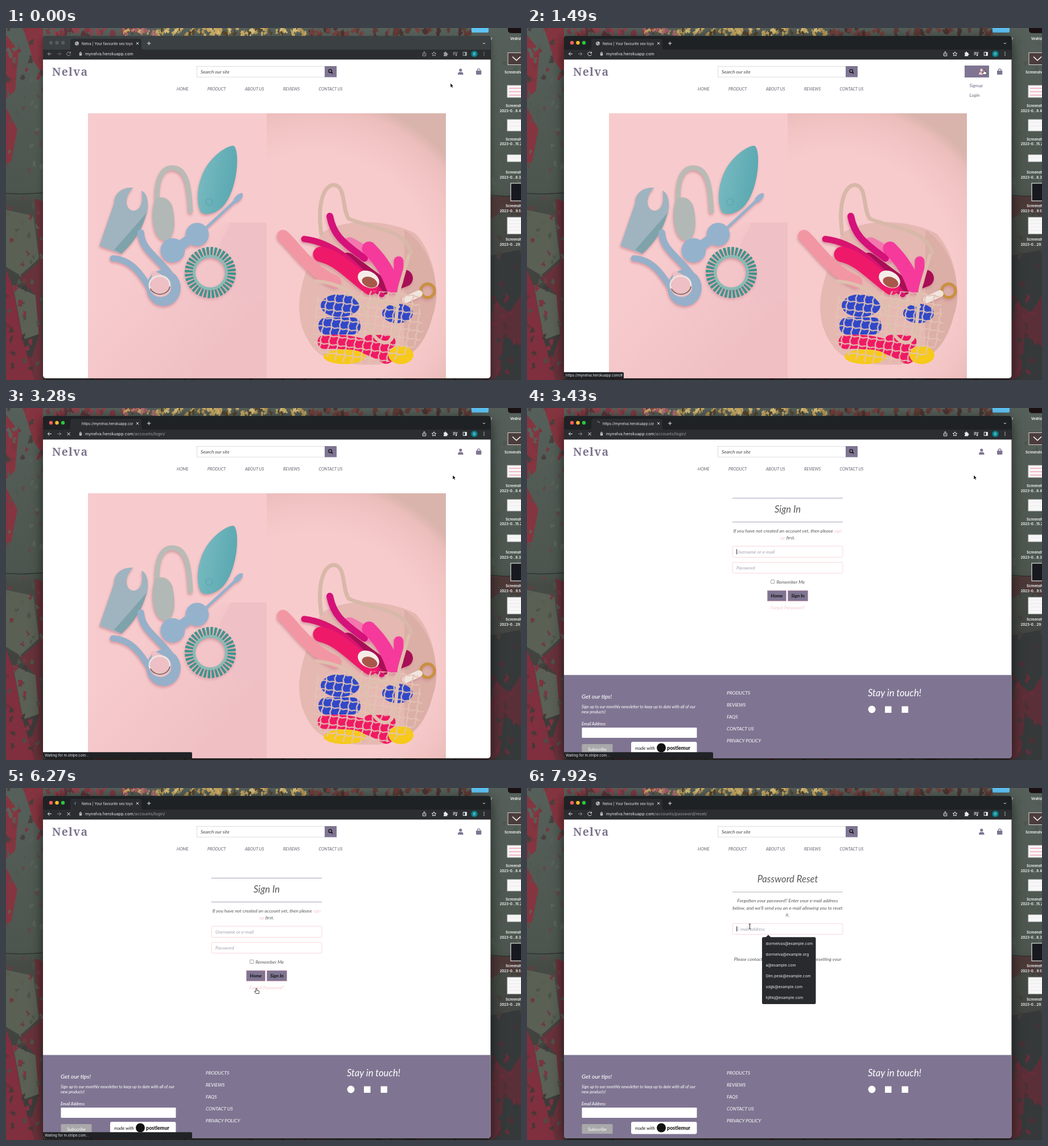
An HTML page for the animation above (8 s loop, 905 by 619 pixels).

```html
<!DOCTYPE html>
<html lang="en">
<head>
<meta charset="utf-8">
<title>Shop account walkthrough</title>
<style>
html, body { margin: 0; width: 100%; height: 100%; overflow: hidden; background: #434a45; }
svg { display: block; width: 100vw; height: 100vh; }
text { white-space: pre; }
#page { font: italic 8.32px Lato, sans-serif; fill: #5a5a5a; }
.ui { font: 6.24px Inter, sans-serif; fill: #e8eaed; }
.mid { text-anchor: middle; }
.big { font-size: 16.64px; }
.small { font-size: 7.28px; }
.pale { fill: #f9c6cf; }
.hint { fill: #a3a3b3; }
.box { fill: #fff; stroke: #f8cdd4; stroke-width: .8; }
.btn { fill: #7f7592; stroke: #e5a3b5; stroke-width: .6; }
.line { fill: none; stroke: #e8eaed; stroke-width: 1; }
.photo path { stroke-linecap: round; }
.lit { filter: drop-shadow(-1px 3px 2px #c9868fb0); }
#desk { font: 600 6.1px Inter, sans-serif; fill: #fff; }
</style>
</head>
<body>
<svg viewBox="0 0 905 619" preserveAspectRatio="none">
<defs>
  <clipPath id="win"><rect x="65" y="14" width="786.5" height="602" rx="5"/></clipPath>
  <clipPath id="pic"><rect x="144" y="150" width="629" height="466"/></clipPath>
  <clipPath id="tabClip"><rect x="132" y="20" width="91" height="14"/></clipPath>
  <linearGradient id="wall" x2="0" y2="1">
    <stop offset="0" stop-color="#56605a"/><stop offset=".46" stop-color="#4c564e"/>
    <stop offset=".5" stop-color="#464b45"/><stop offset="1" stop-color="#3a3838"/>
  </linearGradient>
  <linearGradient id="shade" gradientUnits="userSpaceOnUse" x1="240" y1="400" x2="400" y2="540">
    <stop offset="0" stop-color="#f7cbcd"/><stop offset="1" stop-color="#efbfc4"/>
  </linearGradient>
  <radialGradient id="glow" gradientUnits="userSpaceOnUse" cx="540" cy="430" r="370">
    <stop offset=".56" stop-color="#f7cbcc"/><stop offset=".7" stop-color="#f2c4c4"/>
    <stop offset=".79" stop-color="#ebbdbb"/><stop offset=".84" stop-color="#d9b4ac"/>
  </radialGradient>
  <linearGradient id="leaf" x2="1" y2=".3"><stop offset="0" stop-color="#7cbcc2"/><stop offset="1" stop-color="#5ba9b2"/></linearGradient>
  <pattern id="net" width="15" height="15" patternUnits="userSpaceOnUse" patternTransform="rotate(8)">
    <path d="M0 8Q8 4 15 8M8 0Q12 8 8 15" fill="none" stroke="#e3c3b3" stroke-width="2.2"/>
  </pattern>
  <pattern id="knit" width="10" height="10" patternUnits="userSpaceOnUse" patternTransform="rotate(38)">
    <path d="M0 4Q5 7 10 4M4 0Q7 5 4 10" fill="none" stroke="#ebcfc2" stroke-width="1.7"/>
  </pattern>
</defs>

<rect width="905" height="619" fill="url(#wall)"/>
<g id="paint">
  <path d="M0 12L22 40 16 110 0 125ZM30 0H65V82L48 58ZM0 140L20 178 9 235 0 238Z" fill="#85353f"/>
  <path d="M0 320L48 330 58 405 25 435 0 420ZM12 452L52 470 58 538 30 548Z" fill="#5a6054"/>
  <path d="M50 300L65 305V480L58 400ZM24 440L60 410 65 619H32L58 540 52 470Z" fill="#68323a"/>
  <path d="M0 425L12 455 30 550 50 619H0Z" fill="#7f2f3d"/>
  <path d="M852 296H905V330L875 322 852 335Z" fill="#4c3837"/>
  <path d="M852 400L905 390V619H852Z" fill="#35393a"/>
  <path d="M858 480L885 500 905 470V560L875 540 868 610 852 619V520Z" fill="#5a2f38"/>
</g>
<path d="M0 291L30 292 65 290M851 294L880 296 905 293" fill="none" stroke="#24282a" stroke-width="1.2"/>
<g id="desk"></g>

<rect id="shadow" x="65" y="14" width="786.5" height="602" rx="5"/>
<g clip-path="url(#win)">
  <rect id="strip" x="65" y="14" width="787" height="24"/>
  <path d="M110 38Q113 38 113 34V23Q113 19 117 19H234Q238 19 238 23V34Q238 38 241 38H852V56H65V38Z" fill="#2b2d30"/>
  <g id="lights"><circle cx="79" cy="26" r="3.2"/><circle cx="89.5" cy="26" r="3.2"/><circle cx="100" cy="26" r="3.2"/></g>
  <g id="globe"><circle cx="124.5" cy="27.2" r="3.4" fill="#c3c8ce"/><path d="M122 25l2.5.5-.5 2-2 .4M125 30l1-2 1.5-.3" fill="none" stroke="#45494d" stroke-width=".9"/></g>
  <path id="spin" d="M124.5 24A3.3 3.3 0 0 1 127.8 27.3" fill="none" stroke="#8ab4f8" stroke-width=".9"/>
  <text id="tab" class="ui" x="133" y="29.5" clip-path="url(#tabClip)"></text>
  <path class="line" d="M229 25l4.2 4.2M233.2 25l-4.2 4.2M248 27h6.4M251.2 23.8v6.4M838 26l2 2 2-2"/>
  <g id="tools">
    <path class="line" d="M80 45.5H73.5M76.5 42.3L73.3 45.5 76.5 48.7"/>
    <path class="line" d="M90 45.5H96.5M93.5 42.3L96.7 45.5 93.5 48.7" opacity=".5"/>
    <path id="reload" class="line" d="M112.8 43.5A3.3 3.3 0 1 0 113.3 46.5M113.5 41.8V44.2H111"/>
    <path id="stop" class="line" d="M107.5 43l5.2 5.2M112.7 43l-5.2 5.2"/>
    <path class="line" d="M733.5 44.5H732.3V49H737.8V44.5H736.6M735 47V41.5M733.3 43.2L735 41.5 736.7 43.2" stroke-width=".8"/>
    <path class="line" d="M752 41.8l1.1 2.5 2.7.3-2 1.8.6 2.7-2.4-1.4-2.4 1.4.6-2.7-2-1.8 2.7-.3z" stroke-width=".8"/>
    <path d="M769 43.2h2v-.6a1.1 1.1 0 0 1 2.2 0v.6h2v2h.5a1.1 1.1 0 0 1 0 2.2h-.5v2h-6.2v-2a1.1 1.1 0 0 0 0-2.2z" fill="#e8eaed"/>
    <path class="line" d="M785.5 43h5M785.5 45h5M785.5 47h3M791.8 48V43h1.7"/><circle cx="791" cy="48" r="1.2" fill="#e8eaed"/>
    <path class="line" d="M803.3 42.5h6v6h-6z"/><path d="M806.5 42.5h3v6h-3z" fill="#e8eaed"/>
    <g fill="#e8eaed"><circle cx="840" cy="42.7" r=".8"/><circle cx="840" cy="45.5" r=".8"/><circle cx="840" cy="48.3" r=".8"/></g>
  </g>
  <circle cx="823" cy="45.5" r="5.6" fill="#00838f"/><text class="ui mid" x="823" y="47.6">B</text>
  <path d="M128.8 44.8h4.4v3.6h-4.4z" fill="#bdc1c6"/><path class="line" d="M129.7 45v-1.2a1.3 1.3 0 0 1 2.6 0V45" stroke-width=".7"/>
  <text class="ui" x="139" y="48.2" style="font-size:7.28px">mynelva.herokuapp.com<tspan id="path" fill="#9aa0a6"></tspan></text>

  <g id="page">
    <rect x="65" y="55.5" width="787" height="562" fill="#fff"/>
    <text x="81" y="84" style="font:600 19.5px 'Noto Serif',serif;letter-spacing:1.3px" fill="#7c748c">Nelva</text>
    <rect x="335.4" y="67.4" width="225" height="18.8" fill="#fff" stroke="#d5d5dc" stroke-width=".8"/>
    <text x="342" y="80" fill="#444">Search our site</text>
    <rect x="560" y="67" width="21" height="19.5" fill="#7f7592"/>
    <path d="M571.5 77.5L574 80.3" stroke="#111" stroke-width="1.7"/><circle cx="569.7" cy="75.7" r="2.8" fill="none" stroke="#111" stroke-width="1.3"/>
    <g class="small" fill="#666170"><text x="300" y="110">HOME</text><text x="354" y="110">PRODUCT</text><text x="420" y="110">ABOUT US</text><text x="487" y="110">REVIEWS</text><text x="549.5" y="110">CONTACT US</text></g>
    <rect id="hover" x="769" y="66" width="43" height="21" fill="#7f7592"/>
    <g id="user"><circle cx="798.8" cy="74" r="2.6"/><path d="M794 82Q794 77.4 797 77.4H800.6Q803.6 77.4 803.6 82Z"/></g>
    <path d="M826 75h9.4v5.5q0 1.5-1.5 1.5h-6.4q-1.5 0-1.5-1.5z" fill="#7f7592"/><path d="M828.3 76v-1.8a2.4 2.4 0 0 1 4.8 0V76" fill="none" stroke="#7f7592" stroke-width="1.2"/>

    <g id="home" class="photo" clip-path="url(#pic)">
      <rect x="144" y="150" width="315" height="467" fill="#f7cbcd"/>
      <path d="M458 342H380L300 400H144V617H458Z" fill="url(#shade)"/>
      <path d="M458 342H395L375 380 400 480H458Z" fill="#efc0c5"/>
      <rect x="458" y="150" width="315" height="467" fill="url(#glow)"/>
      <g class="lit">
        <path d="M190 308C190 290 205 279 224 281 211 291 206 316 222 321 237 323 242 304 238 286 249 290 252 310 247 328L203 397 164 383Z" fill="#a0b4c0"/>
        <path d="M190 390L247 325Q238 365 203 397Z" fill="#7fa3ab"/>
        <path d="M266 315C262 262 276 246 292 246 318 246 322 280 324 322" fill="none" stroke="#b9bbb6" stroke-width="9"/>
        <path d="M262 302C270 295 284 296 292 312 300 345 296 374 278 374 258 372 252 325 262 302Z" fill="#b2b8b5"/>
        <path d="M400 207C412 215 407 288 380 315 365 329 345 331 341 321 332 300 338 262 356 238 372 217 392 206 400 207Z" fill="url(#leaf)"/>
        <circle cx="357" cy="306" r="6" fill="none" stroke="#559fa8"/>
        <g fill="#95b2cd"><circle cx="293" cy="391" r="21.5"/><circle cx="336" cy="363" r="20.5"/><path d="M300 387L330 367" stroke="#95b2cd" stroke-width="18"/><path d="M350 353L404 303" stroke="#95b2cd" stroke-width="5"/><ellipse cx="408" cy="299" rx="11" ry="5" transform="rotate(-46 408 299)"/></g>
        <g fill="none" stroke="#96b0c9"><path d="M237 360C238 392 272 405 294 442" stroke-width="12"/><path d="M188 405C220 407 238 432 255 462" stroke-width="11"/></g>
        <ellipse cx="277" cy="457" rx="30" ry="32" fill="#96b0c9"/>
        <path d="M258 427Q287 437 290 455A18 16 0 0 1 253 458Z" fill="#eebfc4"/>
        <ellipse cx="270" cy="452" rx="18" ry="16" fill="none" stroke="#eee3df" stroke-width="3"/><path d="M254 459A18 16 0 0 0 288 455" fill="none" stroke="#8d6c68" stroke-width="2"/>
        <circle cx="359" cy="430" r="36" fill="none" stroke="#3f948d" stroke-width="18" stroke-dasharray="3.9 2.383"/>
        <circle cx="359" cy="430" r="28.5" fill="none" stroke="#8bbab4" stroke-width="5"/>
      </g>

      <path id="bag" d="M553 362C600 330 680 340 720 362 755 400 763 470 750 505 735 560 705 593 640 592 570 592 540 580 520 525 508 480 520 440 553 362Z" fill="#e5b8b2"/>
      <use href="#bag" style="fill:url(#knit)"/>
      <path d="M700 355C755 390 765 470 750 505 740 550 720 570 700 582Z" fill="#c99a90" opacity=".35"/>
      <path d="M554 362C546 305 560 275 577 276 598 279 590 318 602 335 635 352 700 350 712 395" fill="none" stroke="#d8b8a9" stroke-width="7"/>
      <g fill="none" class="lit">
        <path d="M600 410L660 455 700 440" stroke="#a80f55" stroke-width="30"/>
        <path d="M487 366C508 385 535 428 578 446" stroke="#f396a3" stroke-width="22"/>
        <path d="M604 380L640 400" stroke="#f377ae" stroke-width="24"/>
        <path d="M569 331C575 362 588 375 630 405" stroke="#d5117a" stroke-width="12"/>
        <path d="M524 371C575 377 610 410 660 468" stroke="#d91370" stroke-width="11"/>
        <path d="M553 398C585 405 605 430 640 456" stroke="#ee1a69" stroke-width="27"/>
        <path d="M638 388C660 410 672 430 680 455" stroke="#f53a9b" stroke-width="25"/>
        <path d="M690 410V445" stroke="#f53a9b" stroke-width="17"/>
        <circle cx="741" cy="462" r="12" stroke="#c8913f" stroke-width="5"/><path d="M702 478L726 467" stroke="#f1e5df" stroke-width="12"/>
      </g>
      <ellipse cx="637" cy="442" rx="20" ry="14" transform="rotate(28 637 442)" fill="#f6ede8"/><ellipse cx="639" cy="447" rx="14" ry="9" transform="rotate(20 639 447)" fill="#a8584a"/>
      <g fill="#3048c8"><ellipse cx="587" cy="488" rx="34" ry="20"/><ellipse cx="688" cy="502" rx="27" ry="17"/><rect x="549" y="509" width="74" height="30" rx="14"/></g>
      <path d="M560 552Q620 548 668 578M640 552H672" fill="none" stroke="#f01963" stroke-width="25"/>
      <g fill="#f6c91b"><ellipse cx="595" cy="578" rx="37" ry="13"/><ellipse cx="694" cy="575" rx="22" ry="16"/></g>
      <path d="M545 470Q640 455 725 470L735 540Q700 592 640 591 560 592 540 555Z" fill="url(#net)"/>
      <path d="M545 445C595 450 618 470 632 500 638 540 655 554 668 553 690 550 683 500 692 455L708 400" fill="none" stroke="#dfbfae" stroke-width="6"/>
      <path d="M630 488Q655 475 690 490" fill="none" stroke="#dfbfae" stroke-width="5"/>
    </g>

    <g id="menu"><rect id="itemBg" x="769" width="80" height="17" fill="#e9ecef"/><g fill="#6f6780"><text x="777.5" y="103.5">Signup</text><text x="777.5" y="120.5">Login</text></g></g>

    <g id="signin">
      <path d="M361 158.5H555M361 200.5H555" stroke="#9d97b6" stroke-width=".9"/>
      <text class="mid big" x="458" y="183.5">Sign In</text>
      <text class="mid" x="458" y="218.5">If you have not created an account yet, then please <tspan class="pale">sign</tspan></text>
      <text class="mid" x="458" y="231"><tspan class="pale">up</tspan> first.</text>
      <rect id="ring" x="360.5" y="242" width="195.5" height="21.5" rx="2.5" fill="none" stroke="#b4d4fd" stroke-width="2.4"/>
      <rect class="box" id="name" x="361.4" y="243" width="193.6" height="19.5" rx="2"/><text class="hint" x="368" y="255.7">Username or e-mail</text>
      <rect class="box" x="361.4" y="271.4" width="193.6" height="19" rx="2"/><text class="hint" x="368" y="284">Password</text>
      <rect x="428.6" y="302.3" width="6.2" height="6.2" rx="1" fill="#fff" stroke="#767676" stroke-width=".7"/><text x="438.5" y="308.6">Remember Me</text>
      <rect class="btn" x="422.3" y="321" width="33.2" height="18.5"/><rect class="btn" x="458.3" y="321" width="35.4" height="18.5"/>
      <g class="mid" font-weight="700" fill="#111"><text x="439" y="333.2">Home</text><text x="476" y="333.2">Sign In</text></g>
      <text class="mid pale" x="458" y="353.6">Forgot Password?</text>
    </g>

    <g id="reset">
      <text class="mid big" x="458" y="166">Password Reset</text>
      <path d="M361 183H555" stroke="#aaa" stroke-width=".9"/>
      <g class="mid"><text x="458" y="201">Forgotten your password? Enter your e-mail address</text><text x="458" y="213.5">below, and we'll send you an e-mail allowing you to reset</text><text x="458" y="226">it.</text><text x="458" y="303.7">Please contact us if you have any trouble resetting your</text><text x="458" y="316.2">password.</text></g>
      <rect class="box" x="361.4" y="238.4" width="193.6" height="19" rx="2"/><text class="hint" x="368" y="250.8">E-mail address</text>
      <rect class="btn" x="418.9" y="266.9" width="78.6" height="18.5"/><text class="mid" x="458" y="279" fill="#111">Reset My Password</text>
    </g>
    <rect id="caret" x="368" width=".8" height="9.5" fill="#222"/>

    <g id="foot" fill="#fff">
      <rect x="65" y="469.5" width="787" height="148" fill="#7f7592"/>
      <text x="96" y="511" style="font-size:10.4px;font-weight:500">Get our tips!</text>
      <g class="small"><text x="96" y="528">Sign up to our monthly newsletter to keep up to date with all of our</text><text x="96" y="537">new products!</text><text x="96" y="558" font-weight="500">Email Address <tspan fill="#e85c5c">*</tspan></text></g>
      <rect x="96.5" y="562" width="202" height="18" rx="1"/>
      <rect x="96.5" y="591" width="54" height="17" rx="1.5" fill="#a9a8aa"/><text class="mid" x="123.5" y="602.5">Subscribe</text>
      <rect x="183" y="587" width="115.5" height="21.5" rx="3"/>
      <g fill="#111" font-style="normal"><text x="190" y="600.8" style="font-size:7.6px">made with</text><circle cx="236" cy="597.5" r="8"/><text x="246" y="600.5" style="font-size:9px;font-weight:800">postlemur</text></g>
      <text x="351" y="504">PRODUCTS</text><text x="351" y="525">REVIEWS</text><text x="351" y="546">FAQS</text><text x="351" y="567">CONTACT US</text><text x="351" y="588">PRIVACY POLICY</text>
      <text class="big" x="599" y="506.5">Stay in touch!</text>
      <circle cx="606" cy="530" r="6.5"/><rect x="629" y="524.5" width="11.5" height="11.5"/><rect x="658.5" y="524.5" width="11.5" height="11.5"/>
    </g>
  </g>
  <g id="status"><rect x="63" y="605.2" height="14" rx="2" fill="#202225"/><text class="ui" x="68" y="613.3"></text></g>
</g>
<g id="popup"><path d="M419 263L424 258.3 429 263Z" fill="#282a2d"/><rect x="413" y="262.3" width="94.5" height="117.7" rx="2.5" fill="#282a2d"/></g>
<g id="cursor" stroke-linejoin="round">
  <path id="arrow" d="M0 0V7.6L1.8 6 3 8.8 4.3 8.2 3.1 5.5H5.5Z" fill="#000" stroke="#fff" stroke-width=".6"/>
  <path id="hand" d="M-1 .8Q-1-.3 0-.3T1 .8V3.6L4 4.2Q5.2 4.5 5 5.8L4.3 9H-.8L-3.4 5.8Q-3.3 4.6-2 5L-1 5.8Z" fill="#fff" stroke="#111" stroke-width=".8"/>
  <path id="beam" d="M-1.7-4.5Q0-4.5 0-3.5Q0-4.5 1.7-4.5M0-3.5V3.5M-1.7 4.5Q0 4.5 0 3.5Q0 4.5 1.7 4.5" fill="none" stroke="#111" stroke-width=".9"/>
</g>
</svg>
<script>
const $ = id => document.getElementById(id);
const add = (parent, tag, attrs, text) => {
  const el = document.createElementNS('http://www.w3.org/2000/svg', tag);
  for (const k in attrs) el.setAttribute(k, attrs[k]);
  if (text) el.textContent = text;
  return parent.appendChild(el);
};
const show = (id, on) => $(id).setAttribute('visibility', on ? 'inherit' : 'hidden');
const within = (t, a, b) => t >= a && t < b;
const held = (keys, t) => keys.filter(k => k[0] <= t).pop();

// Weathered wall: small jagged flakes scattered in an area
let seed = 7;
const rnd = () => (seed = seed * 16807 % 2147483647) / 2147483647;
function flakes(x, y, w, h, size, count, ...colours) {
  for (let i = 0; i < count; i++) {
    const cx = x + rnd() * w, cy = y + rnd() * h, pts = [];
    for (let a = 0; a < 6.28; a += .6) {
      const r = size * (.2 + rnd());
      pts.push((cx + r * Math.cos(a) * .7).toFixed(1) + ',' + (cy + r * Math.sin(a)).toFixed(1));
    }
    add($('paint'), 'polygon', { points: pts.join(' '), fill: colours[i % colours.length] });
  }
}
flakes(0, 0, 65, 100, 7, 22, '#78363d', '#58605a', '#49403f');
flakes(0, 100, 65, 185, 6, 24, '#59635a', '#4e5850', '#5f4a48');
flakes(0, 300, 65, 150, 6, 24, '#565d51', '#4c5348', '#6d3a40');
flakes(0, 450, 65, 165, 7, 28, '#6c2f39', '#4f4c46', '#7f3240', '#43393a');
flakes(855, 20, 50, 260, 7, 14, '#525d55', '#4d5750');
flakes(855, 300, 50, 110, 7, 12, '#3f4743', '#453f3c');
flakes(855, 415, 50, 200, 7, 28, '#363a3a', '#4b3035', '#662d39');
flakes(65, 0, 170, 12, 8, 34, '#8f414b', '#7c3a44', '#5b363a');
flakes(205, 0, 60, 12, 6, 20, '#b07474', '#a2606a', '#c6a862');
flakes(265, 0, 265, 12, 6, 80, '#c6a862', '#b79655', '#d5bd7a', '#c6a862', '#55452f');
flakes(535, 0, 280, 12, 8, 40, '#603b36', '#4a3431', '#75403d');
flakes(65, 617, 790, 2, 5, 50, '#35282b', '#4e2a32', '#303533');

// Desktop icons
const desk = $('desk');
add(desk, 'rect', { x: 818, y: -8, width: 30, height: 16, rx: 2, fill: '#5ec4f5' });
add(desk, 'rect', { x: 882, y: -15, width: 30, height: 24, rx: 5, fill: '#1b1114' });
add(desk, 'rect', { x: 882, y: 43.5, width: 30, height: 21, fill: '#4b3d3c', stroke: '#d8d0cc' });
add(desk, 'path', { d: 'M890 50.5L897 57 904 50.5', fill: 'none', stroke: '#fff', 'stroke-width': 1.6 });
[[101, 21], [161, 20], [223, 12], [273, 31], [333, 29]].forEach(([y, h], i) => {
  const dark = i == 3;
  add(desk, 'rect', { x: dark ? 887 : 881, y, width: 30, height: h, fill: dark ? '#17191f' : '#f8f7f8', stroke: dark ? '#fff' : '#ccc' });
  if (!dark) for (let r = y + 5; r < y + h - 3; r += 6)
    add(desk, 'path', { d: `M884 ${r}H905`, stroke: i ? '#e2dfe3' : '#efa3b3', 'stroke-width': i ? .7 : 1.5 });
});
const label = (x, y, s) => add(desk, 'text', { x, y }, s);
label(852, 21, 'r');
label(886, 21, 'Vedrizo');
label(876, 80, 'Screenshot');
['8.4', '15.2', '8.3', '9.5', '29.1'].forEach((s, i) => {
  label(878, 139 + i * 58.7, 'Screenshot');
  label(867.5, 147.7 + i * 58.7, '2023-0...' + s);
});

['dormelvas@example.com', 'dormelva@example.org', 'a@example.com', 'Olm.pesk@example.com', 'sdgk@example.com', 'hjlhkj@example.com']
  .forEach((s, i) => add($('popup'), 'text', { class: 'ui', x: 419.5, y: 276.3 + i * 18.95, style: 'font-size:6.76px' }, s));

const host = 'https://mynelva.herokuapp.com', wait = 'Waiting for m.stripe.com...';
const pointer = [
  [0, 781, 97, 'arrow'], [1040, 786, 92, 'arrow'], [1190, 796, 82, 'hand'], [1340, 802, 75, 'hand'], [1490, 803, 73, 'hand'],
  [1790, 800, 84, 'hand'], [1940, 794, 97, 'hand'], [2090, 789, 106, 'hand'], [2240, 786, 115, 'hand'], [2390, 785, 118, 'hand'],
  [3130, 785, 118, 'arrow'], [3880, 779, 122, 'arrow'], [4030, 745, 150, 'arrow'], [4180, 690, 200, 'arrow'], [4330, 620, 260, 'arrow'],
  [4480, 560, 310, 'arrow'], [4630, 510, 345, 'arrow'], [4780, 485, 357, 'arrow'], [4930, 455, 359, 'arrow'], [5080, 442, 359, 'arrow'],
  [5380, 441, 354, 'hand'], [5530, 440, 352.5, 'hand'], [7320, 431, 335, 'arrow'], [7470, 408, 282, 'arrow'], [7620, 391.5, 243.5, 'beam']
];
// [time, text, width, opacity]
const bubbles = [
  [0, '', 0, 0], [1340, host + '/#', 105, 1], [1940, host + '/accounts/signup/', 157, 1], [2240, host + '/accounts/login/', 152, 1],
  [2990, wait, 262, 1], [3880, wait, 262, .5], [4030, '', 0, 0],
  [5530, host + '/accounts/password/reset/', 180, 1], [6130, wait, 262, 1], [7020, wait, 262, .5], [7170, wait, 262, .18], [7320, '', 0, 0]
];

function render(t) {
  const active = t >= 300;
  $('strip').setAttribute('fill', active ? '#1f2225' : '#3b4043');
  $('tools').setAttribute('opacity', active ? 1 : .6);
  $('shadow').style.filter = `drop-shadow(0 5px ${active ? 11 : 6}px rgba(0,0,0,${active ? .6 : .4}))`;
  [...$('lights').children].forEach((c, i) => c.setAttribute('fill', active ? ['#ff5f57', '#febc2e', '#28c840'][i] : '#575b5e'));

  const loading = within(t, 2840, 3580) || within(t, 5980, 6720);
  const raw = within(t, 3130, 3580) || within(t, 6420, 6720);
  $('tab').textContent = raw ? host : 'Nelva | Your favourite sex toys';
  $('path').textContent = t >= 6420 ? '/accounts/password/reset/' : t >= 3130 ? '/accounts/login/' : '';
  show('globe', !loading);
  show('spin', loading && !within(t, 3280, 3430));
  $('spin').setAttribute('transform', `rotate(${Math.floor((t + 20) / 150) * 54 - 1260} 124.5 27.3)`);
  show('reload', !loading);
  show('stop', loading);

  const hover = within(t, 1190, 1790);
  show('hover', hover);
  $('user').setAttribute('fill', hover ? '#f8c6cc' : '#7f7592');
  const menu = within(t, 1490, 3130);
  show('menu', menu);
  show('itemBg', menu && t >= 1940);
  $('itemBg').setAttribute('y', t < 2240 ? 92.5 : 109.5);

  show('home', t < 3430);
  show('signin', within(t, 3430, 6570));
  show('reset', t >= 6570);
  show('foot', t >= 3430);
  const focus = within(t, 3580, 5830);
  show('ring', focus);
  $('name').style.stroke = focus ? '#86b7fe' : '';
  show('caret', within(t, 3430, 5830) && (t - 3430) % 1000 < 500 || t >= 7920);
  $('caret').setAttribute('y', t < 6570 ? 248 : 243);
  show('popup', t >= 7920);

  const [, text, width, opacity] = held(bubbles, t), [rect, line] = $('status').children;
  rect.setAttribute('width', width + 2);
  line.textContent = text;
  $('status').setAttribute('opacity', opacity);

  const [, x, y, kind] = held(pointer, t);
  $('cursor').setAttribute('transform', `translate(${x} ${y})`);
  for (const id of ['arrow', 'hand', 'beam']) show(id, id == kind);
}

const start = performance.now();
function frame() {
  render((performance.now() - start) % 8000);
  requestAnimationFrame(frame);
}
frame();
</script>
</body>
</html>
```
